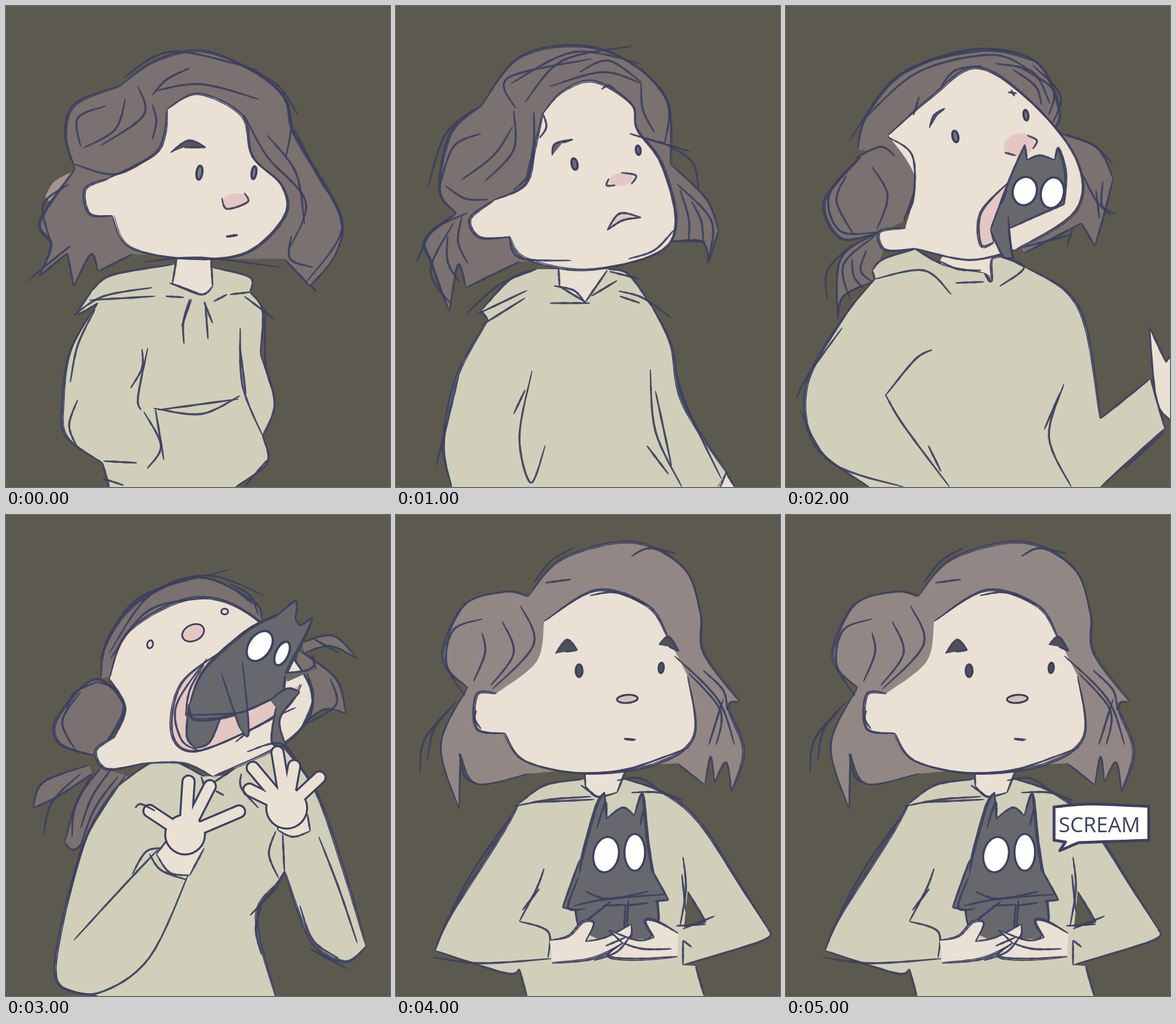
An HTML page for the animation above (6 s loop, 669 px wide and 837 px high).

```html
<!DOCTYPE html>
<html lang="en">
<head>
<meta charset="utf-8">
<title>Scream</title>
<style>
html, body { margin: 0; width: 100%; height: 100%; overflow: hidden; background: #5c5a4f; }
svg { display: block; width: 100%; height: 100%; }
text { font-family: 'Open Sans', 'Noto Sans', sans-serif; font-stretch: 75%; font-weight: 500; }
</style>
</head>
<body>
<svg id="stage" viewBox="0 0 669 837"></svg>
<script>
const LOOP = 6000;
const INK = '#3c415f', HAIR = '#7a7170', PALE_HAIR = '#928784', SHINE = '#a3958f', SKIN = '#eae0d4',
      CLOTH = '#d1cfba', PINK = '#e4c7c3', BEAST = '#66686d', BACK = '#5c5a4f', WHITE = '#fff';
const stage = document.getElementById('stage');
let layer = stage;

function add(name, attrs = {}) {
  const el = document.createElementNS('http://www.w3.org/2000/svg', name);
  for (const key in attrs) el.setAttribute(key, attrs[key]);
  return layer.appendChild(el);
}

// Smooth runs through "x,y" points; "/" ends a run in a corner, "~" marks a run without ink.
function runs(text) {
  let corner = null;
  return text.split('/').map(part => {
    const bare = part.includes('~'), line = [];
    const pts = part.replace('~', '').trim().split(/\s+/).map(p => p.split(',').map(Number));
    if (corner) pts.unshift(corner);
    corner = pts[pts.length - 1];
    for (let i = 0; i < pts.length - 1; i++) {
      const b = pts[i], c = pts[i + 1], a = pts[i - 1] || b, d = pts[i + 2] || c;
      for (let t = 0; t < 1; t += 1 / 8) {
        line.push([0, 1].map(n => b[n] + t / 2 * (c[n] - a[n] +
          t * (2 * a[n] - 5 * b[n] + 4 * c[n] - d[n] + t * (3 * b[n] - a[n] - 3 * c[n] + d[n])))));
      }
    }
    line.push(corner);
    return { line, bare };
  });
}

const outline = pts => 'M' + pts.map(p => p.map(v => v.toFixed(1))).join('L') + 'Z';

// A pencil ribbon that thins out at both ends; drift bends it off its path.
function ribbon(pts, width, drift = 0) {
  const left = [], right = [], last = pts.length - 1;
  pts.forEach(([x, y], i) => {
    const p = pts[Math.max(0, i - 1)], q = pts[Math.min(last, i + 1)];
    const dx = q[0] - p[0], dy = q[1] - p[1], len = Math.hypot(dx, dy) || 1;
    const half = width / 2 * (.4 + .6 * Math.sqrt(Math.sin(Math.PI * i / last))) * (1 + .12 * Math.sin(i * 2.7));
    const off = drift * Math.sin(i / 9);
    left.push([x - dy / len * (off + half), y + dx / len * (off + half)]);
    right.unshift([x - dy / len * (off - half), y + dx / len * (off - half)]);
  });
  add('path', { d: outline(left.concat(right)), fill: INK, opacity: .92 });
}

function ink(...strokes) {
  for (const text of strokes) for (const { line } of runs(text)) if (line.length > 1) ribbon(line, 3.7);
}

function part(color, text, width = 3.8) {
  const all = runs(text);
  const shape = add('path', { d: outline(all.flatMap(r => r.line)), fill: color });
  for (const { line, bare } of all) {
    if (bare || !width || line.length < 2) continue;
    ribbon(line, width);
    if (line.length > 20) ribbon(line, 2, 3);
  }
  return shape;
}

const oval = (cx, cy, rx, ry, turn, fill, line = 0) => add('ellipse', {
  cx, cy, rx, ry, fill, stroke: INK, 'stroke-width': line, transform: `rotate(${turn} ${cx} ${cy})`
});

// Fingers fan out from a round palm.
function hand(x, y, palm, tips) {
  for (const [color, grow] of [[INK, 3.4], [SKIN, 0]]) {
    add('circle', { cx: x, cy: y, r: palm + grow, fill: color });
    for (const tip of tips.split(' ')) {
      add('path', { d: `M${x},${y}L${tip}`, stroke: color, 'stroke-width': 18 + 2 * grow, 'stroke-linecap': 'round' });
    }
  }
}

function scene(from, to, draw) {
  layer = stage;
  layer = add('g');
  draw();
  const steps = [[0, from ? 0 : 1], [from, 1], [to, to < LOOP ? 0 : 1], [LOOP, to < LOOP ? 0 : 1]];
  layer.animate(steps.map(([at, opacity]) => ({ offset: at / LOOP, opacity, easing: 'step-end' })),
    { duration: LOOP, iterations: Infinity });
}

// Calm
scene(0, 1000, () => {
  part(SHINE, '68,332 85,305 125,284 / 130,300 75,340', 0);
  part(HAIR, '200,138 260,95 340,77 425,110 485,160 502,225 580,360 575,430 530,488 / 485,440 / ~400,440 / ~220,432 / 160,462 / 148,432 118,488 / 107,430 / 58,470 / 78,415 58,375 120,283 / 103,225 120,170 200,138');
  part(CLOTH, '150,495 185,468 290,450 / ~360,455 / 425,472 425,498 / 447,530 443,605 / 468,690 447,748 / 455,795 400,837 / ~180,837 / 168,795 / 105,750 98,690 112,600 160,517 / 125,535 150,495');
  part(SKIN, '298,435 290,483 / 340,502 360,488 / 357,435');
  part(SKIN, '280,180 335,152 412,190 430,262 480,312 485,365 420,428 320,440 215,420 185,365 / 145,362 137,318 178,300 / 255,260 275,225 280,180');
  ink('255,155 280,128 320,108', '258,148 340,136 440,162', '415,190 455,262 522,340 495,420', '455,225 505,290 520,380');
  ink('480,150 497,200 488,262', '503,215 540,290 586,385 522,482', '497,400 495,440 535,455', '425,108 475,140 508,188', '205,125 290,79 440,112');
  ink('208,162 190,215 135,247', '230,140 240,190 165,243', '130,245 125,195 174,174', '255,172 262,200 255,232');
  ink('110,310 65,345 76,405', '38,478 90,435 112,418', '118,275 190,293 255,262', '240,445 340,438 480,455', '530,485 540,497');
  part('#5a5658', '287,255 318,234 348,246 / 310,246');
  oval(337, 290, 5, 12, 8, '#817d82', 4);
  oval(432, 290, 4, 11, 8, '#817d82', 4);
  oval(399, 339, 23, 13, -10, PINK);
  ink('376,334 385,353 421,341 415,325', '383,401 404,398', '384,402 403,399', '285,482 335,500');
  ink('118,538 170,505 255,490', '145,512 260,505', '278,505 310,507', '320,510 309,550 310,588', '323,510 306,558', '347,515 352,580', '345,515 360,552', '362,514 385,502', '425,498 390,502', '415,505 468,545');
  ink('155,528 125,590 112,655', '125,685 110,730 125,770', '170,792 228,795', '237,597 237,630 217,665', '247,595 230,680 235,703', '240,706 270,765 246,805', '260,700 275,790', '257,700 340,710 408,678', '265,703 405,684');
  ink('408,560 412,660 447,748', '407,590 418,675', '452,525 452,620 465,670', '168,822 205,834', '455,790 415,837');
});

// Uneasy
scene(1000, 2000, () => {
  part(HAIR, '150,172 210,92 300,68 390,88 470,160 478,275 / 540,335 562,390 / 545,445 / 533,410 480,410 / ~340,440 / ~215,445 / 122,490 / 108,450 93,532 / 62,450 50,405 105,360 / 75,320 95,220 150,172');
  part(CLOTH, '148,530 200,475 245,458 / ~370,458 / 405,467 447,525 / 480,590 500,690 575,810 / ~560,837 / ~97,837 / 82,760 105,645 160,545 / 148,530');
  part(SKIN, '574,810 590,837 / ~562,837');
  part(SKIN, '283,455 285,488 / 330,515 / 368,460');
  part(SKIN, '255,188 290,148 345,130 410,170 420,215 462,275 487,375 455,430 330,460 225,440 197,402 / 145,403 128,370 170,338 / 225,310 240,250 255,188');
  ink('225,167 290,95 410,70', '208,178 195,125 340,92', '200,135 310,80 425,100', '320,115 370,95 428,133', '268,140 360,115 428,135', '427,108 474,170 468,240', '427,135 430,180 450,220');
  ink('240,185 240,240 228,295', '255,185 262,210 250,230', '358,145 370,138 382,146', '407,222 440,232 512,253', '460,235 515,270 527,318');
  ink('490,310 550,375 542,448', '495,320 510,370 510,410', '480,409 540,410', '515,340 532,375 535,412');
  ink('135,180 85,225 56,315', '148,222 100,245 75,318', '205,182 205,250 155,305', '203,210 170,260 115,302', '242,250 230,295 205,320', '85,312 120,335 160,337');
  ink('125,360 65,390 36,445', '100,378 60,460 95,518', '90,400 90,445 110,480', '115,365 108,410 125,448', '197,400 215,438 305,443', '405,440 450,425 484,390');
  part('#68686a', '272,260 277,240 308,232 / 290,238');
  oval(311, 275, 5, 10, -12, '#6b6a78', 4);
  oval(422, 251, 4, 8, -8, '#6b6a78', 4);
  oval(392, 302, 21, 11, -8, PINK);
  ink('371,300 367,312 382,312', '392,290 418,295 410,310');
  part(PINK, '368,390 390,361 427,368 / 395,373 368,390');
  ink('123,535 180,485 240,460', '140,537 228,495', '225,508 150,555', '110,640 88,730 70,800', '237,635 215,750 235,830 260,765', '225,668 205,710');
  ink('275,487 310,495 330,517', '268,517 338,517', '340,505 385,478', '372,462 425,475', '388,496 430,508 480,543', '390,505 425,517');
  ink('488,640 510,705 567,823', '443,632 452,740 498,837', '452,670 480,800', '437,765 475,815', '576,810 565,837');
});

// Something climbs out
scene(2000, 3000, () => {
  part(HAIR, '125,250 140,190 205,115 330,75 435,97 475,180 465,218 / 540,245 570,300 / 555,360 538,418 / 515,378 / 415,430 / ~340,300 / ~200,260 125,250');
  part(HAIR, '160,395 95,440 90,545 / 100,505 150,480 / ~170,425');
  part(HAIR, '178,226 227,290 205,375 / ~160,395 / 95,405 66,340 130,262 / ~178,226');
  part(SKIN, '633,558 662,620 / 675,600 / ~669,720 / 645,685 633,558');
  part(CLOTH, '150,460 170,440 225,423 / 275,450 345,464 / 357,478 357,440 380,435 / 418,455 / 490,497 525,565 548,718 / 635,648 / 660,735 / 548,837 / ~145,837 / 50,765 35,660 98,545 155,475 / 150,460');
  part(SKIN, '272,436 275,450 345,464 357,478 / ~357,440 385,430', 0);
  part(SKIN, '178,225 250,160 330,106 420,160 505,265 505,355 400,424 / 320,442 225,422 / 172,425 162,392 208,386 / ~225,300 178,225');
  ink('110,235 200,118 345,78 440,98', '133,200 230,115 360,85 430,115', '270,140 295,112 340,104', '232,158 222,190', '365,100 430,115 460,170', '410,108 465,145 458,190', '430,103 478,155 465,203', '395,110 435,140 445,172');
  ink('490,226 535,242 570,275', '515,290 545,345 575,362', '552,305 550,345 565,363', '546,370 540,320', '412,420 497,398', '490,417 500,385');
  ink('178,228 220,260 222,335 205,370', '105,295 88,340 118,398', '150,280 177,330 158,390', '128,262 75,330 95,392 165,393', '120,265 165,245 190,262', '155,400 100,450 112,512', '115,440 118,470 135,492', '140,425 130,460 150,480', '115,415 72,460 72,510');
  ink('250,212 258,190 277,178', '252,208 262,190 275,180', '387,150 402,152', '392,146 398,157');
  oval(295, 227, 5, 10, -12, '#77757c', 4);
  oval(418, 190, 4, 9, -8, '#77757c', 4);
  oval(406, 242, 27, 20, -15, PINK);
  ink('420,225 437,234 430,249', '381,255 400,260');
  part(PINK, '387,307 340,360 340,415 362,411 / 360,380 387,330');
  part(BEAST, '356,390 390,300 416,241 / 420,268 / 442,260 468,268 / 475,247 488,290 485,345 / 440,364 387,388 / 395,438 / 378,435 356,390');
  ink('387,365 392,420 397,440', '375,345 385,320');
  oval(416, 322, 21, 25, 15, WHITE, 4);
  oval(464, 325, 20, 27, 12, WHITE, 4);
  ink('268,444 300,458 340,460', '375,437 415,455 372,488', '295,482 345,480', '155,475 240,460 288,502', '98,560 40,640 18,682', '25,705 80,795 205,837');
  ink('255,598 225,615 173,678', '173,676 205,730 285,837', '248,765 270,810', '484,658 458,750 497,837', '478,672 450,737', '660,740 590,805');
});

// Out it comes
scene(3000, 4000, () => {
  part(HAIR, '165,285 175,220 230,150 335,108 430,150 445,180 / ~400,230 / ~165,285');
  part(HAIR, '130,300 165,286 207,335 160,420 / 95,400 85,360 130,300');
  part(HAIR, '510,235 575,285 592,345 / 550,340 490,390 / ~500,300');
  part(HAIR, '515,222 570,210 612,250 / 565,228 520,240');
  part(HAIR, '165,440 125,495 102,570 / 130,575 215,455');
  part(HAIR, '145,435 65,465 47,510 / 90,490 150,450');
  part(CLOTH, '190,475 270,425 345,455 / ~385,453 / ~440,398 480,400 / 540,480 590,620 628,750 / 590,778 530,740 485,620 / 475,640 437,700 470,837 / ~160,837 / 90,815 95,720 140,560 190,475');
  part(SKIN, '180,285 215,200 330,143 435,180 530,300 500,385 360,455 / 310,432 240,432 / 175,443 155,410 190,385 / 208,335 180,285');
  ink('163,250 230,145 390,95', '182,250 250,165 360,143', '180,240 250,140 350,105 450,140', '390,120 425,140 440,175', '400,130 430,155', '130,308 98,360 125,415', '155,290 185,300 205,330', '105,345 118,310 160,290');
  ink('535,215 580,240', '565,285 575,330 520,365', '525,275 535,320 515,370', '130,450 80,500 65,558', '150,450 120,510 115,560', '185,440 150,490 130,545', '195,455 155,510 130,575', '400,395 440,365 505,335');
  oval(251, 225, 5, 7, 15, SKIN, 3);
  oval(381, 168, 6, 5, 0, SKIN, 3);
  oval(326, 205, 20, 14, -25, PINK, 3);
  part(PINK, '375,237 305,295 290,380 330,411 430,372 490,335 515,295 / ~440,320');
  part(BEAST, '318,330 315,385 330,406 / 355,395 375,350');
  part(BEAST, '318,335 345,268 420,200 475,173 / 505,150 504,182 / 513,193 / 535,178 / 520,215 490,275 485,310 / 400,348 330,357 318,335');
  part(BEAST, '375,275 400,350 408,372 / 423,378 412,255', 3.4);
  part(BEAST, '460,322 490,302 512,308 / 477,355 488,402 / 463,395 470,335');
  part(BEAST, '485,275 525,270 540,257 / 533,245 540,268 / ~490,290');
  ink('350,250 297,330 305,390 335,410', '345,260 320,305 313,350', '318,348 400,345 430,335', '405,210 440,188 475,172');
  oval(442, 228, 19, 29, 35, WHITE, 4);
  oval(481, 241, 11, 22, 25, WHITE, 4);
  ink('210,450 140,560 110,660', '92,820 160,832 250,770 322,615', '118,740 210,640 265,582', '220,625 245,585 280,580', '470,550 458,590 475,632', '482,555 485,620');
  ink('512,680 535,740 580,772', '545,560 580,650 612,745', '425,697 475,645', '445,680 435,720 445,765', '530,755 595,790', '340,455 350,485', '355,470 400,440', '365,480 380,488', '420,412 480,398 520,450');
  part(SKIN, '285,560 262,590 / 285,622 320,627 / 345,580', 3.6);
  hand(312, 556, 33, '250,515 318,464 355,472 406,516');
  part(SKIN, '475,530 473,548 / 500,560 530,550 / 525,520', 3.6);
  hand(489, 510, 34, '424,478 430,440 473,413 502,437 546,457');
  ink('225,510 235,503 260,515', '250,590 270,618 315,635', '410,450 410,475 440,510');
});

// Held at last
scene(4000, 6000, () => {
  part(PALE_HAIR, '230,142 290,75 410,46 500,90 530,170 535,240 598,325 / 580,335 607,410 585,482 / 575,430 555,465 / 548,420 538,470 / 490,432 / ~350,440 / ~232,450 / 140,468 112,415 / 110,512 / 78,400 125,300 / 90,270 82,230 120,155 190,134 230,142', 3.2);
  part(CLOTH, '213,503 260,470 325,460 / ~400,460 / 465,482 530,535 610,660 648,720 / 640,740 500,783 / ~522,785 / 537,837 / ~228,837 / 215,790 / 190,797 68,758 / 95,695 180,560 213,503');
  part(BACK, '508,655 540,708 / 502,716');
  part(SKIN, '328,440 330,472 / 350,490 385,483 / 402,440');
  part(SKIN, '~258,185 / 350,130 440,158 475,215 / ~508,280 / 520,385 450,435 330,450 225,428 190,380 / 140,372 140,312 175,310 / ~245,255 258,185');
  ink('240,118 270,80 310,57', '410,72 440,58 488,67', '260,118 305,112', '338,140 385,135 440,158', '150,181 100,200 88,260 120,315', '217,158 240,225 168,303', '150,205 155,240 135,290', '185,185 205,240 165,297');
  ink('105,325 50,390 42,450', '92,340 65,375 55,427', '110,415 120,455 140,467', '485,245 560,320 590,400', '510,275 565,340 558,400', '535,270 570,305 577,340', '570,320 545,400', '310,450 400,443 510,405', '140,340 137,355 148,372');
  part('#504f58', '278,241 298,217 316,235 / 295,238');
  part('#504f58', '458,226 475,212 493,237 / 475,229');
  oval(319, 271, 6, 11, 0, '#51505f', 3.5);
  oval(462, 266, 4.5, 9, 5, '#51505f', 3.5);
  oval(403, 320, 18, 7, -4, '#d9c1b9', 3.4);
  ink('397,389 418,391', '398,390 415,392', '205,507 270,495 340,490', '240,500 345,495', '385,462 425,458 465,483', '410,483 460,483 500,497', '322,470 350,490', '200,525 140,610 95,690');
  ink('65,770 150,780 270,772', '258,615 245,650 215,707 / 265,725 265,770', '250,650 220,688', '500,740 500,783', '500,595 505,650 495,715', '498,625 505,690', '500,720 555,698', '488,715 540,712');
  part(BEAST, '318,722 312,650 345,515 363,482 / 367,528 / 395,509 415,523 / 430,485 440,570 458,700 440,738 / ~350,737');
  part(BEAST, '320,600 290,683 / 318,688');
  part(BEAST, '443,613 475,670 / 450,672');
  ink('350,545 365,500 367,530', '432,510 425,540', '318,630 300,683 330,685', '330,655 370,668 440,655', '310,680 370,668 470,660', '320,715 375,672', '360,680 400,678 / 397,725', '398,680 440,675', '405,670 402,720');
  oval(366, 591, 22, 31, 12, WHITE, 3.6);
  oval(416, 587, 18, 32, 0, WHITE, 3.6);
  part(SKIN, '268,740 300,732 325,707 345,710 330,742 / 365,735 410,712 / 405,740 345,772 272,780 / ~268,740', 3.4);
  part(SKIN, '492,728 455,708 435,707 450,735 / 420,740 370,722 / 395,745 / 370,767 420,772 490,768 / ~492,728', 3.4);
  ink('345,775 385,760 410,730', '365,750 400,735', '395,745 430,755 480,755', '500,740 515,752');
});

// Its one remark
scene(5000, 6000, () => {
  const bubble = part(WHITE, '467,508 / 530,503 632,507 / 632,566 / 510,570 / 477,584 / 487,569 / 467,566', 0);
  bubble.setAttribute('stroke', INK);
  bubble.setAttribute('stroke-width', 5);
  bubble.setAttribute('stroke-linejoin', 'round');
  const word = add('text', { x: 546, fill: INK, 'text-anchor': 'middle', 'font-size': 52 });
  word.textContent = 'SCREAM';
  const size = Math.min(52, 52 * 142 / word.getComputedTextLength());
  word.setAttribute('font-size', size);
  word.setAttribute('y', 539 + size * .36);
});
</script>
</body>
</html>
```
